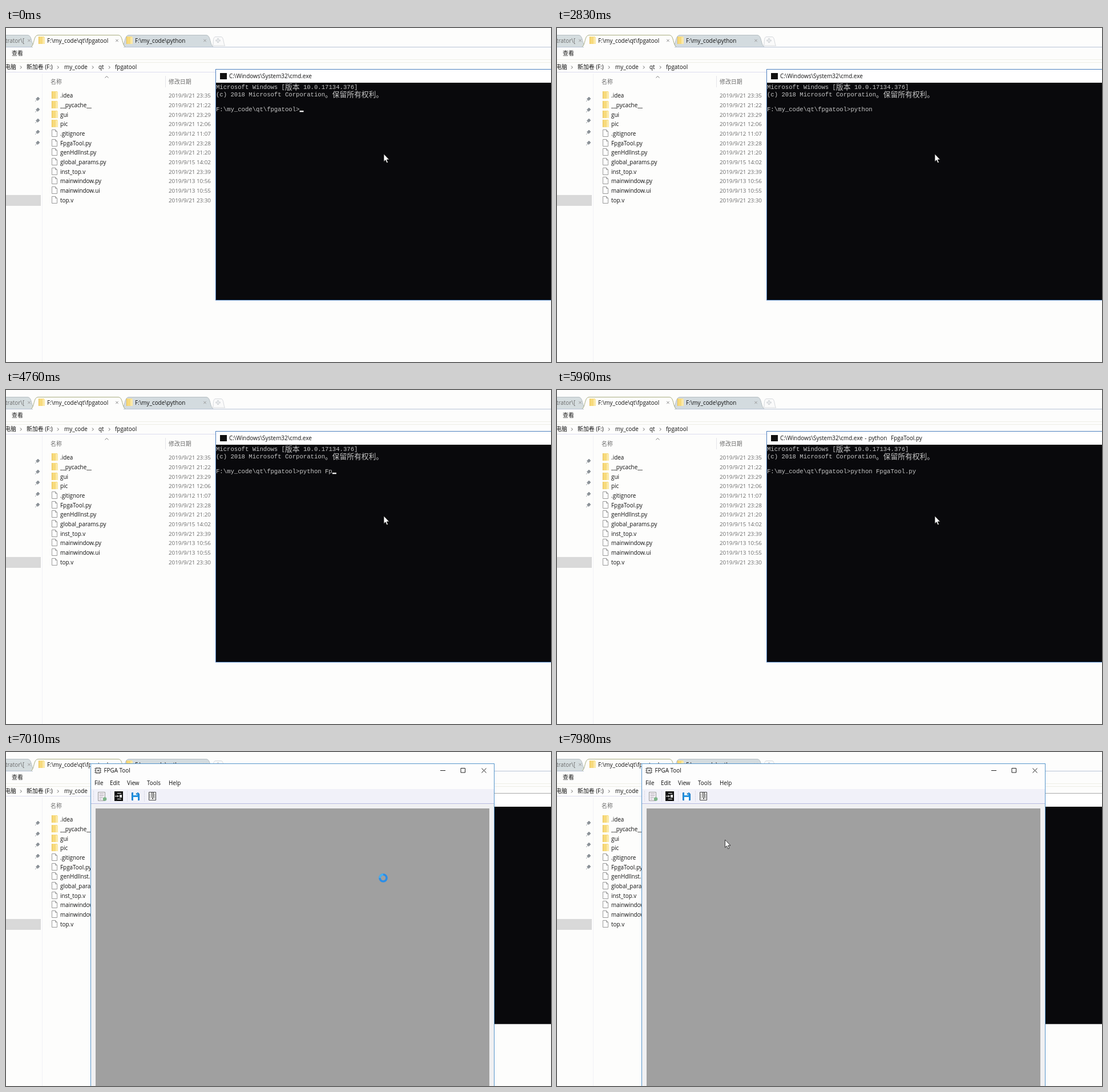
Recreate the animation shown at these times as an HTML page. Size 955 by 586 pixels, loop 8 s.

```html
<!DOCTYPE html>
<html lang="zh">
<head>
<meta charset="utf-8">
<style>
  html, body { margin: 0; width: 100%; height: 100%; overflow: hidden; background: #fdfdfc; }
  svg { display: block; }
  text { font: 9.9px "Open Sans", "Noto Sans CJK SC", "Noto Sans CJK", sans-serif; fill: #111; white-space: pre; }
  .dim { fill: #6c6c6c; }
  .date { font-size: 9.8px; fill: #6c6c6c; }
  .title { word-spacing: .9px; }
  .term { font: 10.62px "Liberation Mono", monospace; fill: #c6c6c6; }
  .cjk { font: 300 12.75px "Noto Sans CJK SC", "Noto Sans CJK", sans-serif; fill: #c6c6c6; }
</style>
</head>
<body>
<svg id="stage" width="955" height="586" viewBox="0 0 955 586"></svg>
<script>
const CELL = 6.37, TERM_X = 368, LOOP = 8000;

const text = (x, y, s, cls = '', id = '') => `<text x="${x}" y="${y}" class="${cls}" id="${id}">${s}</text>`;
const rect = (x, y, w, h, fill, extra = '') => `<rect x="${x}" y="${y}" width="${w}" height="${h}" fill="${fill}" ${extra}/>`;
const path = (d, stroke, fill = 'none', extra = '') => `<path d="${d}" stroke="${stroke}" fill="${fill}" ${extra}/>`;
const cross = (x, y, r, color) => path(`M${x - r} ${y - r}l${2 * r} ${2 * r}m0 ${-2 * r}l${-2 * r} ${2 * r}`, color);
const folder = (x, y) => rect(x, y, 10, 13, '#f7da7c') + rect(x + 7, y + 1, 4, 12, '#fbe9a8') + rect(x, y, 1, 13, '#e9c04f');
const file = (x, y) => path(`M${x + .5} ${y + .5}h6l3 3v9h-9zm6 0v3h3`, '#999', '#fff');
const tab = (x, w, fill, stroke) =>
  path(`M${x} 33C${x + 6} 30 ${x + 4} 12.5 ${x + 12} 12.5H${x + w - 12}C${x + w - 4} 12.5 ${x + w - 6} 30 ${x + w} 33`, stroke, fill);
const pin = y => path(`M51 ${y + 4}l3 -3m-2 -2l4 4m-3 -4l3 -3l3 3l-3 3z`, '#8b9197', '#8b9197', 'stroke-width=".8"');

const entries = [
  ['.idea', '21 23:35'], ['__pycache__', '21 21:22'], ['gui', '21 23:29'], ['pic', '21 12:06'],
  ['.gitignore', '12 11:07'], ['FpgaTool.py', '21 23:28'], ['genHdlInst.py', '21 21:20'],
  ['global_params.py', '15 14:02'], ['inst_top.v', '21 23:39'], ['mainwindow.py', '13 10:56'],
  ['mainwindow.ui', '13 10:55'], ['top.v', '21 23:30']
];

const explorer = () => rect(0, 0, 955, 586, '#fdfdfc')
  + tab(-40, 90, '#d5dddf', '#b5bec2') + tab(203, 160, '#d3dbdf', '#b5bec2')
  + path('M361 31c4 0 0 -15 6 -15.500h10c5 0 4 15 7 15.500z', '#d5d8dc', '#fafafa')
  + path('M371.500 18v8m-4 -4h8', '#b9bec4', 'none', 'stroke-width="2.500"')
  + path('M371.500 18.500v7m-3.500 -3.500h7', '#fff')
  + path('M0 33.500H955', '#b7c3d6') + tab(44, 165, '#fdfdfc', '#a9ad80') + rect(47, 33, 159, 2, '#fdfdfc')
  + text(-1, 26, 'trator\\[', 'dim') + cross(40.5, 22, 2.2, '#999')
  + folder(57, 15) + text(72, 26, 'F:\\my_code\\qt\\fpgatool') + cross(194.500, 22, 2.2, '#888')
  + folder(211, 15) + text(226, 26, 'F:\\my_code\\python') + cross(348.500, 22, 2.2, '#999')
  + text(10, 48, '查看') + path('M0 55.500H955M0 60.500H955', '#eeeee6') + path('M0 77.500H368', '#dcdcf0')
  + [[-2, '电脑'], [36, '新加卷 (F:)'], [102, 'my_code'], [162, 'qt'], [191, 'fpgatool']].map(([x, s]) => text(x, 72, s)).join('')
  + [25, 90, 151, 180].map(x => path(`M${x} 66.500l2.300 2.500l-2.300 2.500`, '#666')).join('')
  + path('M63.500 80V586', '#f1f1f7') + path('M279.500 84V104', '#e4e4e8') + path('M173.500 87.500l3 -3l3 3', '#777')
  + text(78, 98, '名称', 'dim') + text(285, 98, '修改日期', 'dim')
  + [125, 144, 163, 183, 202].map(pin).join('') + rect(0, 293, 61, 19, '#d9d9d9')
  + entries.map(([name, date], i) => {
    const y = Math.round(122.2 + i * 16.68);
    return (i < 4 ? folder : file)(80, y - 11) + text(95, y, name) + text(285, y, '2019/9/' + date, 'date');
  }).join('');

const terminal = () => rect(367.5, 72.5, 600, 405, '#09090c', 'id="frame"')
  + rect(368, 73, 587, 23, '#fff') + rect(375, 79, 12, 11, '#111') + text(391, 88, '', 'title', 'title')
  + text(TERM_X, 107, 'Microsoft Windows [', 'term') + text(TERM_X + 19 * CELL, 108, '版本', 'cjk')
  + text(TERM_X + 24 * CELL, 107, '10.0.17134.376]', 'term')
  + text(TERM_X, 120, '(c) 2018 Microsoft Corporation', 'term')
  + text(TERM_X + 30 * CELL, 120.500, '。保留所有权利。', 'cjk')
  + text(TERM_X, 146, '', 'term', 'line')
  + rect(0, 0, 7, 2.4, '#eee', 'id="block"') + path('', '#ddd', 'none', 'id="compose"');

const chip = () => path('M158 26.500v12m3 -12v12m3 -12v12M155 29.500h12m-12 3h12m-12 3h12', '#555', 'none', 'stroke-width=".9"')
  + rect(157.5, 28.5, 7.5, 8, '#fff', 'stroke="#444"') + rect(160, 31, 3, 3, '#777');

const toolbar = () => path('M153.500 68v19M183.500 68v19M212.500 68v19M242.500 68v19', '#d6d6e2', 'none', 'stroke-dasharray="2 1"')
  + path('M161.500 70.500h12v15h-12z', '#999', '#f4f0f6') + path('M163.500 73.500h8m-8 3h8m-8 3h6m-6 3h4', '#a8a2ad')
  + '<circle cx="173" cy="82.500" r="3.300" fill="#7eb58a"/>'
  + rect(190, 69, 15, 17, '#111') + path('M195 72.500h7m-7 10h7M191 77.500h6m-2 -2l2 2l-2 2', '#fff') + rect(199, 75, 4, 5, '#eee')
  + path('M220.500 71.500h11l2 2v11h-13z', '#1675c4', '#2492e0') + rect(223, 71, 7, 5, '#e8f4fc')
  + rect(223, 79, 8, 6, '#fff') + rect(228, 72, 1.5, 3, '#1b6fb5')
  + path('M250.500 70.500h12v14h-12z', '#444', '#f4f4f4') + path('M255.500 70.500v9l1.500 3l1.500 -3v-9z', '#444', '#ccc')
  + path('M252.500 73v9m8 -9v9', '#999');

const app = () => rect(148.5, 20.5, 707, 580, '#f0f0f2', 'stroke="#5796cc"')
  + rect(149, 21, 706, 44, '#fdfdfd') + rect(149, 65, 706, 25, '#f1f1f9') + path('M149 90.500H855', '#b9bde0')
  + chip() + text(171.500, 36, 'FPGA Tool')
  + path('M761 32.500h9M797 28.500h7.500v7.500h-7.500z', '#222') + cross(837.5, 32.5, 4, '#222')
  + [[155, 'File'], [182, 'Edit'], [212, 'View'], [247, 'Tools'], [285, 'Help']].map(([x, s]) => text(x, 58, s)).join('')
  + toolbar() + rect(157, 99, 690, 487, '#a0a0a0');

const pointer = () => `<g id="arrow">${path('M0 0V13.500L3 10.700L5.200 15.800L7.400 14.800L5.200 10H9.500Z', '#111', '#fff', 'stroke-width=".8"')}</g>`
  + '<g id="ring" fill="none" stroke-width="3.600"><circle cx="661" cy="221" r="6" stroke="#2b8ee8"/>'
  + path('M655 221a6 6 0 0 1 6 -6', '#48b0f0') + '</g>';

stage.innerHTML = explorer() + terminal() + `<g id="app">${app()}</g>` + pointer();
const $ = id => document.getElementById(id);
const show = (id, on) => $(id).setAttribute('visibility', on ? 'visible' : 'hidden');

// [time, typed count, caret]: '_' block, 'i' input-method underline, 'n' block on the next line
const prompt = 'F:\\my_code\\qt\\fpgatool>';
const command = 'python FpgaTool.py';
const typing = [
  [0, 0, '_'], [640, 0, ''],
  ...[1, 2, 3, 4, 5, 6].map(n => [740 + 90 * n, n, 'i']),
  [1820, 6, '_'], [2210, 6, ''], [2490, 7, '_'], [2830, 7, ''], [3310, 7, '_'],
  [3660, 8, 'i'], [3840, 9, 'i'], [4760, 9, '_'], [4890, 9, ''],
  [5090, 18, '_'], [5960, 18, ''], [6040, 18, 'n'], [6520, 18, '']
];
const moves = [
  [0, 662, 221], [7440, 590, 200], [7510, 500, 186], [7580, 418, 202],
  [7780, 380, 190], [7880, 330, 168], [7980, 294.5, 154]
];
const at = (list, t) => list.findLast(step => step[0] <= t);

function draw(t) {
  const [, count, caret] = at(typing, t);
  const end = TERM_X + (prompt.length + count) * CELL;
  $('line').textContent = prompt + command.slice(0, count);
  $('title').textContent = 'C:\\Windows\\System32\\cmd.exe' + (t >= 5960 ? ' - python  FpgaTool.py' : '');

  show('block', caret === '_' || caret === 'n');
  $('block').setAttribute('x', caret === 'n' ? TERM_X : end);
  $('block').setAttribute('y', caret === 'n' ? 157.8 : 145);
  show('compose', caret === 'i');
  const start = TERM_X + (prompt.length + (count > 7 ? 7 : 0)) * CELL;
  $('compose').setAttribute('d', `M${start} 147.500H${end}M${Math.floor(end) + .5} 135V148`);

  const open = t >= 7010, busy = t >= 6910 && t < 7090;
  show('app', open);
  $('frame').setAttribute('stroke', open ? '#aaa' : '#4c7fbe');
  show('ring', busy);
  show('arrow', !busy);
  const [, x, y] = at(moves, t);
  $('arrow').setAttribute('transform', `translate(${x} ${y})`);
}

const began = performance.now();
(function tick() {
  draw((performance.now() - began) % LOOP);
  requestAnimationFrame(tick);
})();
</script>
</body>
</html>
```
